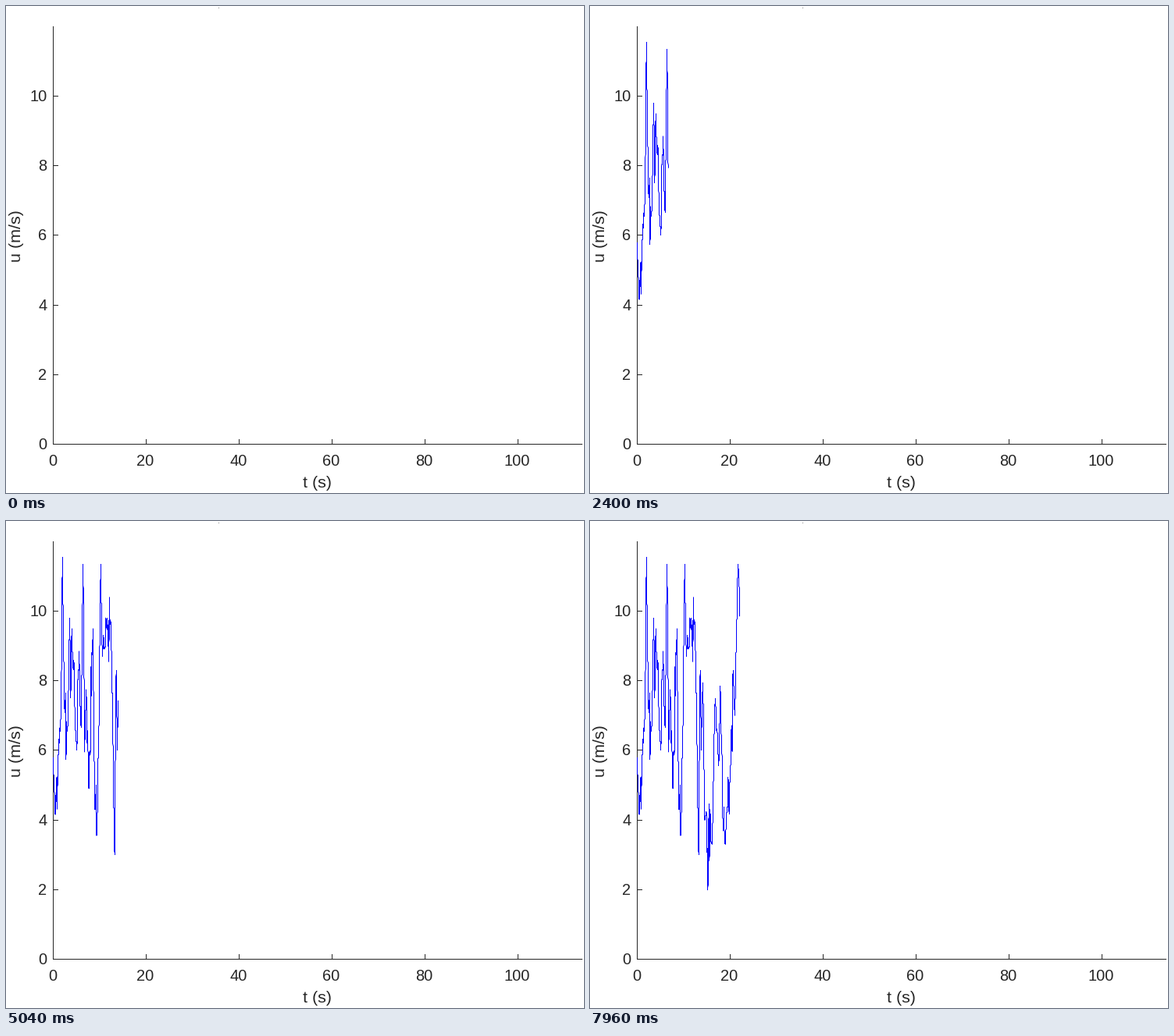
A matplotlib script that plays this animation: 740 by 624 pixels, repeating every 8000 ms.

```python
import numpy as np
import matplotlib
import matplotlib.pyplot as plt
from matplotlib.animation import FuncAnimation
from matplotlib.patches import Rectangle

W, H, DPI = 740, 624, 100
PX = 72 / DPI                      # one pixel in points
INK = "#262626"
FRAMES, INTERVAL = 200, 40
LEFT, TOP, RIGHT, BASE = 60, 26, 738, 561
X_STEP, Y_STEP = 119, 89.2         # pixels between ticks

matplotlib.rcParams["font.family"] = "Liberation Sans"
matplotlib.rcParams["path.simplify"] = False

# Main gusts and lulls of the wind: (frame, speed in m/s)
GUSTS = np.array([
    (0, 5.8), (3, 4.3), (12, 6.2), (15, 7.2), (18, 11.55), (22, 7.2),
    (28, 6.65), (32, 9.8), (34, 7.5), (36, 9.5), (46, 6.0), (50, 8.85),
    (54, 6.65), (58, 11.35), (61, 5.95), (64, 7.75), (69, 4.9), (77, 9.5),
    (81, 4.3), (85, 3.6), (92, 11.35), (95, 8.7), (112, 9.7), (119, 3.0),
    (122, 8.3), (124, 6.0), (127, 7.95), (131, 4.0), (145, 3.3), (151, 7.5),
    (158, 5.55), (161, 7.85), (166, 3.9), (171, 3.3), (180, 5.1),
    (186, 8.3), (189, 7.0), (195, 11.35), (199, 9.85),
])


def wind():
    """Speed at every frame: gusts joined by lines, with turbulence between."""
    n = np.arange(FRAMES)
    mean = np.interp(n, *GUSTS.T)
    gap = np.abs(n[:, None] - GUSTS[:, 0]).min(axis=1)
    noise = np.random.default_rng(4).normal(0, 0.65, FRAMES)
    return mean + noise * np.minimum(gap / 3, 1)


# Fine samples, moved to pixel columns so the line stays crisp
FINE = 20
time = np.arange((FRAMES - 1) * FINE + 1) / FINE
xs = np.floor(LEFT + 0.4 + 0.661 * time) + 0.5
ys = BASE + 0.5 - Y_STEP / 2 * np.interp(time, np.arange(FRAMES), wind())

fig = plt.figure(figsize=(W / DPI, H / DPI), dpi=DPI, facecolor="white")
ax = fig.add_axes([0, 0, 1, 1])
ax.set_xlim(0, W)
ax.set_ylim(H, 0)
ax.axis("off")


def bar(x, y, w=1, h=1, color=INK):
    ax.add_patch(Rectangle((x, y), w, h, fc=color, lw=0))


def label(x, y, text, size, ha="center", rotation=0):
    ax.text(x, y, text, fontsize=size * PX, color=INK, ha=ha, va="baseline",
            rotation=rotation, rotation_mode="anchor")


bar(LEFT, TOP, h=BASE - TOP + 1)
bar(LEFT, BASE, w=RIGHT - LEFT)

for i in range(6):
    x = LEFT + X_STEP * i
    y = round(BASE - Y_STEP * i)
    bar(x, BASE - 6, h=6)
    bar(LEFT, y, w=7)
    label(x - 0.5, 589, str(20 * i), 20)
    label(52.5, y + 7, str(2 * i), 20, ha="right")

label(398.5, 617, "t (s)", 21.5)
label(19, 294.5, "u (m/s)", 21.5, rotation=90)
bar(272, 2, color="#8c8c8c")       # stray speck at the top edge

trace, = ax.plot([], [], color="#0000ff", lw=PX, snap=False,
                 solid_capstyle="butt", solid_joinstyle="miter")


def draw(n):
    end = n * FINE + 1 if n else 0
    trace.set_data(xs[:end], ys[:end])
    return trace,


anim = FuncAnimation(fig, draw, frames=FRAMES, interval=INTERVAL,
                     init_func=lambda: draw(0), blit=True,
                     repeat=True, repeat_delay=0)
plt.show()
```
